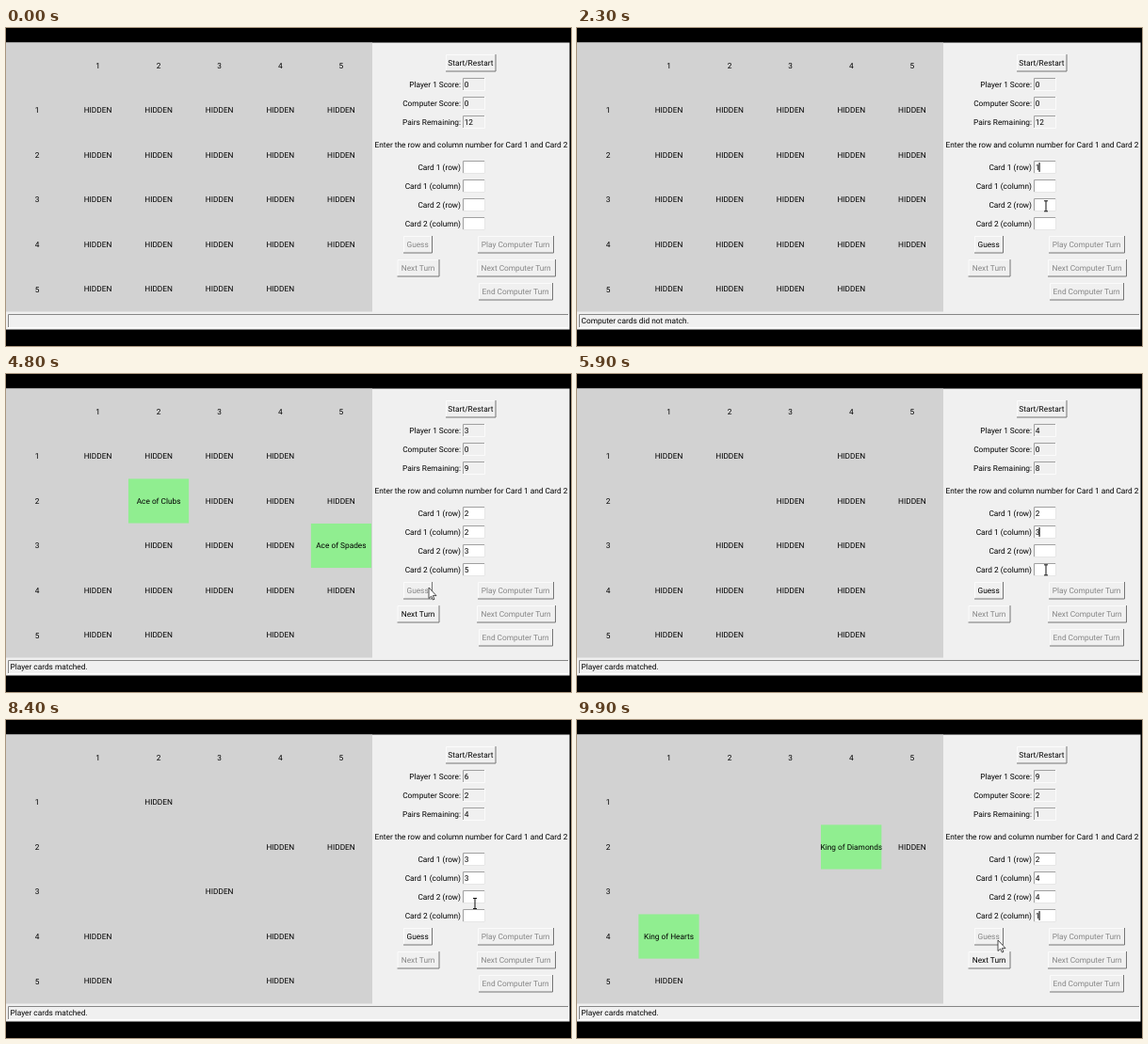
These frames come from a looping animation (600 px wide and 338 px high, 10000 ms). An HTML page:

```html
<!DOCTYPE html>
<html lang="en">
<head>
<meta charset="utf-8">
<title>Matching card game</title>
<style>
  html, body { margin: 0; width: 100%; height: 100%; overflow: hidden; background: #000; }
  svg { display: block; }
  #stage { width: 600px; height: 338px; }
  text { font: 8.3px Roboto, "Open Sans", sans-serif; fill: #000; text-rendering: geometricPrecision; }
  .mid { text-anchor: middle; }
  .end { text-anchor: end; }
  .off text { fill: #858585; }
  .line { fill: none; stroke-width: 1; }
</style>
</head>
<body>
<svg id="stage" viewBox="0 0 600 338"></svg>
<script>
const LOOP = 10000, STEP = 100;
const stage = document.getElementById('stage');

function add(parent, tag, attrs, text) {
  const el = document.createElementNS('http://www.w3.org/2000/svg', tag);
  for (const key in attrs) el.setAttribute(key, attrs[key]);
  if (text !== undefined) el.textContent = text;
  parent.appendChild(el);
  return el;
}
const rect = (p, x, y, width, height, fill) => add(p, 'rect', { x, y, width, height, fill });
const label = (p, x, y, text, cls = 'mid') => add(p, 'text', { x, y: y + 2.9, class: cls }, text);
const show = (el, on) => el.setAttribute('visibility', on ? 'visible' : 'hidden');

function bevel(p, x, y, w, h, topLeft, bottomRight, fill) {
  rect(p, x, y, w, h, fill);
  add(p, 'path', { class: 'line', stroke: topLeft, d: `M${x + .5} ${y + h}V${y + .5}H${x + w}` });
  add(p, 'path', { class: 'line', stroke: bottomRight, d: `M${x} ${y + h - .5}H${x + w - .5}V${y}` });
}
function button(x, y, w, text) {
  const g = add(stage, 'g', {});
  bevel(g, x, y, w, 18.5, '#fbfbfb', '#757575', '#f0f0f0');
  label(g, x + w / 2 - .4, y + 9, text);
  return g;
}
function field(y, text, fill) {
  label(stage, 483, y, text, 'end');
  bevel(stage, 485, y - 7, 24, 14, '#a0a0a0', fill === '#fff' ? '#e6e6e6' : '#fbfbfb', fill);
  return label(stage, 486.7, y, '', '');
}

// Static window
rect(stage, 0, 0, 600, 338, '#000');
rect(stage, 0, 15.5, 598.5, 305, '#f0f0f0');
rect(stage, 0, 15.5, 389, 286, '#d2d2d2');
bevel(stage, 2, 304, 596, 15, '#858585', '#fff', '#f0f0f0');
label(stage, 494, 124, 'Enter the row and column number for Card 1 and Card 2');

const colX = c => 97.5 + (c - 1) * 64.6;
const rowY = r => 87.4 + (r - 1) * 47.55;
for (let i = 1; i <= 5; i++) {
  label(stage, colX(i), 40, i);
  label(stage, 33, rowY(i), i);
}

// Deck: rank letter followed by suit letter, row by row
const ranks = { A: 'Ace', K: 'King', Q: 'Queen', J: 'Jack', T: '10', 9: '9' };
const suits = { C: 'Clubs', D: 'Diamonds', H: 'Hearts', S: 'Spades' };
const deck = ['TC 9C 9S QD JH', 'TH AC JC KD KC', 'JD TS 9D AD AS', 'KH AH JS QH 9H', 'KS QC TD QS'];
const cards = {};
deck.forEach((line, r) => line.split(' ').forEach((code, c) => {
  const w = 64.6, h = 47.55;
  const box = add(stage, 'svg', { x: colX(c + 1) - w / 2, y: rowY(r + 1) - h / 2, width: w, height: h });
  cards[`${r + 1}${c + 1}`] = {
    rank: code[0],
    name: `${ranks[code[0]]} of ${suits[code[1]]}`,
    back: rect(box, 0, 0, w, h, 'none'),
    text: label(box, w / 2, h / 2, 'HIDDEN')
  };
}));

const scores = ['Player 1 Score:', 'Computer Score:', 'Pairs Remaining:']
  .map((s, i) => field(60 + 20 * i, s, '#f0f0f0'));
const fieldY = i => 148 + 20 * i;
const entries = ['Card 1 (row)', 'Card 1 (column)', 'Card 2 (row)', 'Card 2 (column)']
  .map((s, i) => field(fieldY(i), s, '#fff'));
const status = label(stage, 4.5, 311.3, '', '');
const buttons = {
  start: button(467, 28, 53.5, 'Start/Restart'),
  guess: button(422, 221, 31, 'Guess'),
  next: button(415.5, 246, 45, 'Next Turn'),
  play: button(501, 221, 81, 'Play Computer Turn'),
  nextComp: button(500, 246, 84, 'Next Computer Turn'),
  endComp: button(502, 271, 79, 'End Computer Turn')
};
const caret = rect(stage, 490.5, 0, 1.1, 9.8, '#000');
const arrow = add(stage, 'path', {
  d: 'M0 0V11.5L2.6 9.2L4.3 13L6 12.3L4.3 8.6H8Z', fill: '#fff', stroke: '#222', 'stroke-width': .8
});
const beam = add(stage, 'path', {
  d: 'M-2 -5.5H2M0 -5.5V5.5M-2 5.5H2', fill: 'none', stroke: '#111', 'stroke-width': 1
});

// Turns: who, begin, reveal, end (in steps), both cards, pointer spot after the reveal
const turns = [
  ['Player', 2, 12, 15, '13', '14', [455, 238]],
  ['Computer', 15, 15, 20, '44', '31'],
  ['Player', 20, 28, 30, '15', '31'],
  ['Player', 30, 36, 39, '21', '53'],
  ['Player', 39, 47, 50, '22', '35', [449, 227]],
  ['Player', 50, 55, 57, '13', '45'],
  ['Player', 57, 61, 63, '23', '43'],
  ['Player', 63, 67, 69, '33', '14'],
  ['Computer', 69, 69, 72, '34', '42'],
  ['Computer', 72, 72, 74, '11', '32'],
  ['Computer', 74, 74, 77, '24', '52'],
  ['Player', 77, 80, 81, '14', '52'],
  ['Player', 81, 88, 90, '33', '12'],
  ['Player', 90, 93, 95, '44', '54'],
  ['Player', 95, 98, 100, '24', '41', [447, 234]]
].map(([who, begin, reveal, end, a, b, spot]) => ({
  who, begin, reveal, end, a, b, spot,
  human: who === 'Player',
  match: cards[a].rank === cards[b].rank,
  pace: (reveal - 1 - begin) / 4
}));

// Pointer route as [step, x, y]
const route = [[0, 493, 41], [2, 493, 41]];
for (const t of turns) {
  if (t.human) {
    for (let i = 0; i < 4; i++) route.push([t.begin + Math.max(i, .5) * t.pace, 498, fieldY(i) + 7]);
    route.push([t.reveal - 1, 450, 234]);
  }
  route.push([t.reveal + 1, ...(t.spot || (t.human ? [449, 233] : [571, 244]))]);
  const press = t.human ? (t.match ? [440, 258] : [560, 234]) : (t.match ? [560, 258] : [555, 282]);
  route.push([t.end, ...press]);
}

function movePointer(k) {
  const n = route.findIndex(p => p[0] > k);
  const [t0, x0, y0] = route[n - 1], [t1, x1, y1] = route[n];
  const f = (k - t0) / (t1 - t0);
  const x = x0 + (x1 - x0) * f, y = y0 + (y1 - y0) * f;
  const inField = x > 485 && x < 509 && y > 141 && y < 216;
  const shape = inField ? beam : arrow;
  shape.setAttribute('transform', `translate(${x} ${y})`);
  show(beam, k > 0 && inField);
  show(arrow, k > 0 && !inField);
}

function render(k) {
  const turn = turns.find(t => k >= t.begin && k < t.end);
  const done = turns.filter(t => t.reveal <= k);
  const wins = done.filter(t => t.match);
  const open = turn && k >= turn.reveal;
  const gone = new Set(wins.filter(t => t.end <= k).flatMap(t => [t.a, t.b]));

  for (const pos in cards) {
    const card = cards[pos];
    const up = open && (pos === turn.a || pos === turn.b);
    card.back.setAttribute('fill', !up ? 'none' : turn.match ? '#90ee90' : '#ff0');
    card.text.textContent = up ? card.name : gone.has(pos) ? '' : 'HIDDEN';
  }

  const mine = wins.filter(t => t.human).length;
  [mine, wins.length - mine, 12 - wins.length].forEach((v, i) => scores[i].textContent = v);

  const typed = !turn ? 0 : open ? 4 : Math.min(4, Math.floor((k - turn.begin) / turn.pace + 1e-6));
  entries.forEach((el, i) => el.textContent = i < typed ? (turn.a + turn.b)[i] : '');
  caret.setAttribute('y', fieldY(Math.max(typed - 1, 0)) - 4.9);
  show(caret, typed && (k & 2));

  const last = done[done.length - 1];
  status.textContent = last ? `${last.who} cards ${last.match ? 'matched' : 'did not match'}.` : '';

  const human = turn && turn.human;
  const enabled = {
    start: !turn || human,
    guess: human && !open,
    next: human && open && turn.match,
    play: human && open && !turn.match,
    nextComp: turn && !human && turn.match,
    endComp: turn && !human && !turn.match
  };
  for (const id in buttons) buttons[id].setAttribute('class', enabled[id] ? '' : 'off');

  movePointer(k);
}

let shown = -1;
const t0 = performance.now();
function tick() {
  const k = Math.floor((performance.now() - t0) % LOOP / STEP);
  if (k !== shown) render(shown = k);
  requestAnimationFrame(tick);
}
tick();
</script>
</body>
</html>
```
